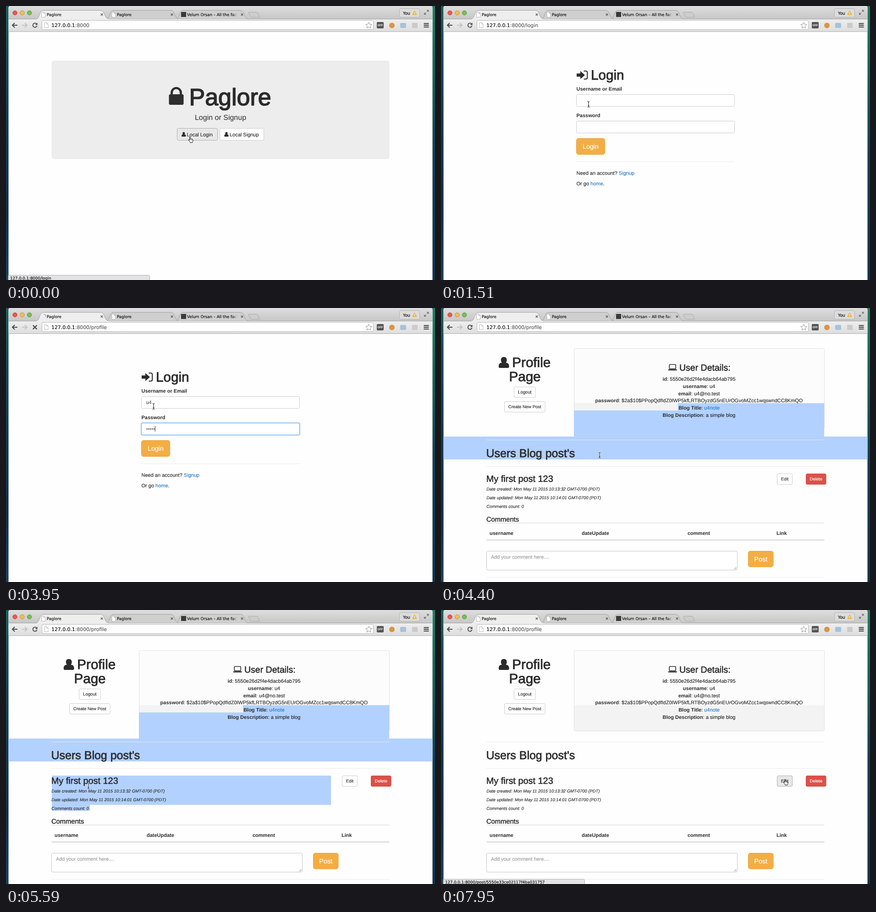
Recreate the animation shown at these times as an HTML page. Size 936x599 px, loop 8 s.

```html
<!DOCTYPE html>
<html lang="en">
<head>
<meta charset="utf-8">
<title>Blog login</title>
<style>
html, body { margin: 0; width: 100%; height: 100%; overflow: hidden; background: #fff; }
svg { display: block; }
text {
  font-family: "Liberation Sans", Arial, sans-serif; font-size: 11px; white-space: pre;
  text-rendering: geometricPrecision;
  color: #2b2b2b; fill: currentColor; stroke: currentColor; stroke-width: .16px;
}
tspan { fill: currentColor; stroke: currentColor; }
.ui { font-family: "DejaVu Sans", sans-serif; color: #151515; stroke-width: .22px; }
.b { font-weight: 700; stroke-width: 0; }
.i { font-style: italic; font-size: 9.42px; }
.med { stroke-width: .03em; }
.thin { stroke-width: 0; }
.mid { text-anchor: middle; }
.link { color: #2a7cc4; }
#url { color: #5c5c5c; }
</style>
</head>
<body>
<svg id="stage" width="936" height="599" viewBox="0 0 936 599"></svg>
<script>
const LOOP = 8000;
const HOST = '127.0.0.1', PORT = ':8000';
const SITE = 'Paglore', USER = 'u4';

const rect = (x, y, w, h, fill, stroke = 'none', r = 0, more = '') =>
  `<rect x="${x}" y="${y}" width="${w}" height="${h}" rx="${r}" fill="${fill}" stroke="${stroke}" ${more}/>`;
const path = (d, fill, stroke = 'none', w = 1, more = '') =>
  `<path d="${d}" fill="${fill}" stroke="${stroke}" stroke-width="${w}" ${more}/>`;
const dot = (x, y, r, fill, stroke = 'none') =>
  `<circle cx="${x}" cy="${y}" r="${r}" fill="${fill}" stroke="${stroke}"/>`;
const text = (x, y, s, cls = '', size = 0, color = '') =>
  `<text x="${x}" y="${y}" class="${cls}" style="${size ? `font-size:${size}px;` : ''}${color ? `color:${color}` : ''}">${s}</text>`;
const group = (id, body) => `<g id="${id}">${body}</g>`;
const bold = s => `<tspan class="b">${s}</tspan>`;
const link = s => `<tspan class="link">${s}</tspan>`;
const hr = (x1, x2, y, color = '#eaeaea', w = 1) => path(`M${x1} ${y}H${x2}`, 'none', color, w);
const button = (x, y, w, h, label, size, fill = '#fff', edge = '#ccc', ink = '') =>
  rect(x, y, w, h, fill, edge, h > 30 ? 4.5 : 2.5) +
  text(x + w / 2, y + h / 2 + size * .36, label, 'mid', size, ink);
const person = (x, y, k) => path(
  'M5 0C7.1 0 7.9 1.6 7.8 3.2C7.7 4.4 7.3 5 6.9 5.6C9.2 5.6 10 7 10 9.2Q10 10.5 8.8 10.5H1.2Q0 10.5 0 9.2C0 7 .8 5.6 3.1 5.6C2.7 5 2.3 4.4 2.2 3.2C2.1 1.6 2.9 0 5 0Z',
  '#2b2b2b', 'none', 1, `transform="translate(${x} ${y}) scale(${k})"`);
const page = (x, y) => path(`M${x} ${y}h5l3 3v8h-8z`, '#fff', '#b0b0b0', .9) +
  path(`M${x + 5} ${y}v3h3`, 'none', '#b0b0b0', .9);

function tab(x, fill, label, textX, closeX) {
  return path(`M${x} 28.5C${x + 8} 28 ${x + 6} 9.5 ${x + 15} 9.5H${x + 141}C${x + 150} 9.5 ${x + 148} 28 ${x + 158} 28.5`, fill, '#a2a2a2') +
    text(textX, 22, label, 'ui', 8.6) +
    path(`M${closeX - 2.3} 16.5l4.6 4.6m0 -4.6l-4.6 4.6`, 'none', '#555', 1.3);
}

function chrome() {
  const lights = [['#f0564e', '#b9433d'], ['#f6bd4b', '#bb8d35'], ['#75c150', '#55943a']]
    .map(([c, e], i) => dot(19.5 + i * 15.8, 15, 4.7, c, e)).join('');
  const clip = '<clipPath id="cut"><rect x="380" y="10" width="124.5" height="18"/></clipPath>';
  const third = tab(371, '#cfcfcf', '', 0, 515) +
    `<g clip-path="url(#cut)">${text(395, 22, 'Velum Orsan – All the facts', 'ui', 8.6)}</g>` +
    rect(494, 13, 11, 12, 'url(#fade)');
  return clip + rect(0, 0, 936, 599, 'url(#leftWall)') + rect(926, 0, 10, 599, 'url(#rightWall)') +
    path('M5.5 599V4Q5.5 0 9.5 0H926.5Q930.5 0 930.5 4V599Z', '#fefefe') +
    path('M5.5 29V4Q5.5 0 9.5 0H926.5Q930.5 0 930.5 4V29Z', 'url(#bar)') +
    rect(5.5, 28.5, 925, 27.5, 'url(#tool)') +
    hr(5.5, 930.5, 28.5, '#a2a2a2') + hr(5.5, 930.5, 56, '#a9a9a9') + lights +
    third + rect(382, 13, 11, 11, '#3a3a3a') +
    tab(219, '#cfcfcf', SITE, 242, 362) + page(231, 13.5) +
    tab(66, '#eee', SITE, 89, 209) + hr(67, 223, 28.8, '#eee', 1.4) +
    path('M531 13.5H546Q549 13.5 550 16L553 24.5H537Q534 24.5 533 22L529 15Q528.5 13.5 531 13.5Z', '#cdcdcd', '#aaa') +
    rect(858.5, 5.5, 44, 19, '#dcdcdc', '#b3b3b3', 3) + text(866, 19, 'You', 'ui', 9.2) +
    path('M891.5 10.5L896 19H887Z', '#f6c343', '#e5a822', 1, 'stroke-linejoin="round"') +
    path('M891.5 13v3m0 1v1', 'none', '#fff', 1) +
    path('M917.5 8.5h5v5zM912 14v5h5z', '#777') + path('M914 17l2.5 -2.5m2 -2l2.5 -2.5', 'none', '#777', 1.5) +
    path('M25 42H14.5M19 37L14 42L19 47', 'none', '#4a4a4a', 2.1) +
    path('M35 42H45.5M41 37L46 42L41 47', 'none', '#c3c3c3', 2.1) +
    rect(78.5, 31.5, 723, 20, '#fff', '#b9b9b9', 2.5) + page(84, 36.5) +
    path('M791.5 35.5l2 4.4 4.8.5-3.6 3.2 1 4.8-4.2-2.5-4.2 2.5 1-4.8-3.6-3.2 4.8-.5z', '#fff', '#888', .9) +
    rect(809, 35, 15, 14, '#555', 'none', 2) + text(816.5, 44.4, 'OFF', 'b mid', 6, '#fff') +
    dot(842, 42.5, 6, '#d99546') + rect(860, 37, 13, 11, '#a5c3dc', 'none', 2) +
    rect(886, 37, 12, 11, '#cbcbcb') +
    path('M911.5 38.4h11m-11 3.8h11m-11 3.8h11', 'none', '#4a4a4a', 2.2) +
    text(99, 46, HOST + '<tspan id="url"></tspan>', 'ui', 10.85) +
    group('idle', page(77.5, 13.5) +
      path('M67 39.4A4.6 4.6 0 1 0 67.6 43.3', 'none', '#4a4a4a', 1.9) + path('M68.6 36.5v5h-5z', '#4a4a4a')) +
    group('busy', path('M58.8 37.8l8.6 8.6m0 -8.6l-8.6 8.6', 'none', '#444', 2.2) +
      path('M82 13.6A5 5 0 0 1 87 19', 'none', '#8b9cba', 1.4));
}

function home() {
  return rect(99.5, 119.5, 737, 215, '#ededed', 'none', 5) +
    rect(355.5, 193, 32, 23, '#2e2e2e', 'none', 3) +
    path('M361.5 195V189.4A10 10 0 0 1 381.5 189.4V195', 'none', '#2e2e2e', 4.8) +
    text(399.5, 217, SITE, 'med', 52) +
    text(468, 248.5, 'Login or Signup', 'mid thin', 16) +
    rect(373.5, 267.5, 88, 26, '#e8e8e8', '#adadad', 3) + person(383, 275.5, .95) + text(394.5, 284.7, 'Local Login') +
    rect(466.5, 267.5, 96, 26, '#fff', '#ccc', 3) + person(476.2, 275.5, .95) + text(488, 284.7, 'Local Signup');
}

function login() {
  const field = y => rect(295.5, y, 345, 26, '#fff', '#ccc', 3);
  const ring = rect(294.5, -1, 347, 28, 'none', '#66afe9', 4, 'stroke-width="4" opacity=".22"') +
    rect(295.5, 0, 345, 26, 'none', '#66afe9', 3);
  const dots = [0, 1, 2, 3, 4].map(i => dot(307.8 + i * 3.85, 264.5, 1.35, '#444')).join('');
  return path('M296 147.5h8V142.3L314 151L304 159.7V154.5h-8z', '#2b2b2b') +
    path('M311.5 142.2H316Q319.2 142.2 319.2 145.4V156.6Q319.2 159.8 316 159.8H311.5', 'none', '#2b2b2b', 2.1) +
    text(327, 161, 'Login', 'med', 29.6) +
    text(295.5, 185, 'Username or Email', 'b') + field(193.5) +
    text(295.5, 243, 'Password', 'b') + field(251.5) + group('ring', ring) +
    '<text id="name" x="305.5" y="210" style="color:#555"></text>' + group('dots', dots) +
    path('M0 0V12', 'none', '#222', 1, 'id="caret"') +
    button(295.5, 289.5, 62, 35, 'Login', 14.3, '#f3ae43', '#eca034', '#fff') +
    hr(295.5, 640.5, 340.5) +
    text(295.5, 368.5, 'Need an account? ' + link('Signup')) +
    text(295.5, 392, 'Or go ' + link('home') + '.');
}

// Selection blocks in the order they grow: x, y, width, height
const MARKS = [
  [517, 208, 319, 16], [290, 224, 546, 57], [5.5, 281, 925, 50],
  [100, 362, 609, 27], [100, 389, 211, 12],
  [311, 389, 398, 12], [100, 401, 609, 25], [100, 426, 83, 13]
];

function profile() {
  const hash = '$2a$10$PPopQdfIdZ0IWP5kfLRTBOyzdG5nEUrOGvoMZcc1wqswndCC8KmQO';
  const facts = [
    ['id', '5550e26d2f4e4dacb64ab795'], ['username', USER], ['email', USER + '@no.test'],
    ['password', hash], ['Blog Title', link(USER + 'note')], ['Blog Description', 'a simple blog']
  ].map(([k, v], i) => text(563, 159.3 + i * 15.65, `${bold(k)}: ${v}`, 'mid')).join('');
  const dates = ['Date created: Mon May 11 2015 10:13:32 GMT-0700 (PDT)',
    'Date updated: Mon May 11 2015 10:14:01 GMT-0700 (PDT)', 'Comments count: 0']
    .map((s, i) => text(99.2, 399 + i * 18.9, s, 'i')).join('');
  const heads = [[106, 'username'], [307, 'dateUpdate'], [538, 'comment'], [732, 'Link']]
    .map(([x, s]) => text(x, 496.3, s, 'b')).join('');
  return rect(290.5, 88.5, 546, 176, '#fcfcfc', '#e0e0e0', 3) +
    rect(291, 208, 226, 16, '#f3f3f3', 'none', 0, 'id="shadeLine"') +
    path('M291 208.5H836V262Q836 264 834 264H293Q291 264 291 262Z', '#f3f3f3', 'none', 1, 'id="shade"') +
    MARKS.map(m => rect(...m, '#b2d1fe', 'none', 0, 'class="mark"')).join('') +
    person(125.8, 107, 2.28) + text(155.3, 129, 'Profile', 'med', 29.6) +
    text(183, 160, 'Page', 'med mid', 29.6) +
    button(159.5, 172.5, 46.5, 23, 'Logout', 9.6) + button(138.5, 204.5, 88.5, 23, 'Create New Post', 9.5) +
    rect(498.2, 123.5, 14, 9.6, 'none', '#2b2b2b', 1.2, 'stroke-width="1.6"') +
    path('M495.5 134.3H515V135.4Q514.5 136.4 513 136.4H497.5Q496 136.4 495.5 135.4Z', '#2b2b2b') +
    text(520, 136.5, 'User Details:', 'med', 19.5) + facts +
    hr(99.5, 836.5, 288.5) + text(98.5, 326, "Users Blog post's", 'med', 25) + hr(99.5, 836.5, 346.5) +
    text(98.8, 379.7, 'My first post 123', 'med', 19.9) + dates +
    group('edit', button(733.5, 362.5, 33, 23, 'Edit', 9.5)) +
    group('editOn', button(733.5, 362.5, 33, 23, 'Edit', 9.5, '#e8e8e8', '#adadad')) +
    button(796.5, 362.5, 43.5, 23, 'Delete', 9.5, '#dc5049', '#d2443c', '#fff') +
    text(99, 467, 'Comments', 'med', 14.7) + hr(99.5, 836.5, 470, '#d0d0d0') + heads +
    hr(99.5, 836.5, 507.2, '#c6c6c6', 1.6) +
    rect(99.5, 531.5, 547, 41.5, '#fff', '#c4c4c4', 3) + text(109, 548.3, 'Add your comment here....', '', 10.8, '#999') +
    path('M639.5 571.5l5-5m-2 5l2-2', 'none', '#777', .9) +
    button(670.5, 531.5, 54.5, 34.5, 'Post', 14.4, '#f3ae43', '#eca034', '#fff') +
    hr(99.5, 836.5, 589);
}

function pointers() {
  const bar = 'M-2.5 -6.3Q0 -6.3 0 -4.5Q0 -6.3 2.5 -6.3M0 -4.5V4.5M-2.5 6.3Q0 6.3 0 4.5Q0 6.3 2.5 6.3M-1.5 2.5H1.5';
  const hand = 'M-2.6 -5.5Q-1.6 -6.8 -.8 -5.4V-1.6Q.6 -2.6 1.2 -1.2Q2.6 -2 3.1 -.6Q4.9 -1 4.9 .8V3Q4.6 4.6 3.9 5.3V6.6H-1.3V5.4Q-3.4 3 -5 .6Q-4.6 -1 -2.6 1Z';
  return group('text', path(bar, 'none', '#fff', 2.6) + path(bar, 'none', '#111', 1)) +
    group('hand', path(hand, '#fff', '#111', 1) + path('M-.8 -1.6V1M1.2 -1V1.2M3.1 -.4V1.4', 'none', '#111', .7)) +
    group('arrow', path('M0 0V12L2.8 9.5L4.8 14L6.8 13.2L4.8 8.8H8.6Z', '#111', '#fff', .9));
}

const grad = (id, ...stops) => `<linearGradient id="${id}" x1="0" y1="0" x2="0" y2="1">` +
  stops.map(([o, c]) => `<stop offset="${o}" stop-color="${c}"/>`).join('') + '</linearGradient>';

document.getElementById('stage').innerHTML = '<defs>' +
  grad('leftWall', [0, '#17605c'], [.2, '#144a56'], [.45, '#123a52'], [.75, '#10304a'], [1, '#1a425b']) +
  grad('rightWall', [0, '#1f8064'], [.25, '#186258'], [.55, '#143f52'], [1, '#12334b']) +
  grad('bar', [0, '#dedede'], [1, '#c6c6c6']) + grad('tool', [0, '#eee'], [1, '#dedede']) +
  '<linearGradient id="fade"><stop offset="0" stop-color="#cfcfcf" stop-opacity="0"/><stop offset="1" stop-color="#cfcfcf"/></linearGradient></defs>' +
  chrome() + group('home', home()) + group('login', login()) + group('profile', profile()) +
  group('status', path('M5 588.5H310.5Q313.5 588.5 313.5 591.5V600H5Z', '#e3e3e3', '#b0b0b0') +
    '<text id="statusText" class="ui" x="9" y="598" style="font-size:8.6px"></text>') +
  group('pointer', pointers());

const $ = id => document.getElementById(id);
const show = (id, on) => { $(id).style.display = on ? '' : 'none'; };
const marks = [...document.querySelectorAll('.mark')];

// Pointer stops: time, x, y, shape
const STOPS = [
  [0, 403, 292, 'hand'], [470, 377, 257, 'text'], [620, 350, 222, 'text'], [770, 336, 198, 'text'],
  [910, 328, 184, 'text'], [1060, 325, 181, 'text'], [1510, 322, 215, 'text'],
  [4400, 346, 322, 'text'], [4550, 369, 440, 'text'], [4700, 360, 465, 'text'], [4850, 325, 454, 'text'],
  [5000, 284, 437, 'text'], [5140, 265, 430, 'text'],
  [5590, 180, 385, 'text'], [5740, 100, 350, 'text'], [5890, 67, 342, 'text'], [6030, 95, 360, 'text'],
  [6330, 106, 366, 'text'], [6480, 124, 368, 'text'], [6630, 190, 376, 'text'], [6780, 290, 380, 'arrow'],
  [6930, 420, 382, 'arrow'], [7080, 550, 382, 'arrow'], [7220, 655, 380, 'arrow'], [7360, 715, 379, 'arrow'],
  [7500, 742, 379, 'hand'], [7650, 749, 378, 'hand'], [7800, 752, 376, 'hand']
];
const KEYS = [2020, 2170], PASS = [2760, 3060, 3200, 3500, 3650];
const passed = (times, t) => times.filter(v => t >= v).length;

function draw(t) {
  const view = t < 470 ? 'home' : t < 4100 ? 'login' : 'profile';
  const busy = (t >= 300 && t < 470) || (t >= 3950 && t < 4100);
  for (const id of ['home', 'login', 'profile']) show(id, id === view);
  show('busy', busy);
  show('idle', !busy);
  $('url').textContent = PORT + (t < 300 ? '' : t < 3950 ? '/login' : '/profile');

  const over = t >= 7500;
  show('status', t < 770 || over);
  $('statusText').textContent = HOST + PORT + (over ? '/post/5550e33ce02117f4ba031757' : '/login');

  const typed = passed(KEYS, t), secret = passed(PASS, t);
  $('name').textContent = USER.slice(0, typed);
  [...$('dots').children].forEach((d, i) => { d.style.display = i < secret ? '' : 'none'; });
  show('ring', t >= 1720);
  $('ring').setAttribute('transform', `translate(0 ${t < 2470 ? 193.5 : 251.5})`);
  show('caret', t >= 1720);
  const caret = t < 2320 ? [306 + typed * 6.1, 200] : [306 + secret * 3.85, 258];
  $('caret').setAttribute('transform', `translate(${caret})`);

  const marked = t < 4400 || t >= 6330 ? 0 : t < 4550 ? 3 : t < 4700 ? 5 : 8;
  marks.forEach((m, i) => { m.style.display = i < marked ? '' : 'none'; });
  show('shadeLine', marked > 0);
  show('shade', t >= 6330);
  show('edit', !over);
  show('editOn', over);

  const [, x, y, shape] = STOPS[passed(STOPS.map(s => s[0]), t) - 1];
  $('pointer').setAttribute('transform', `translate(${x} ${y})`);
  for (const id of ['text', 'hand', 'arrow']) show(id, id === shape);
}

const start = performance.now();
function tick() {
  draw((performance.now() - start) % LOOP);
  requestAnimationFrame(tick);
}
draw(0);
tick();
</script>
</body>
</html>
```
